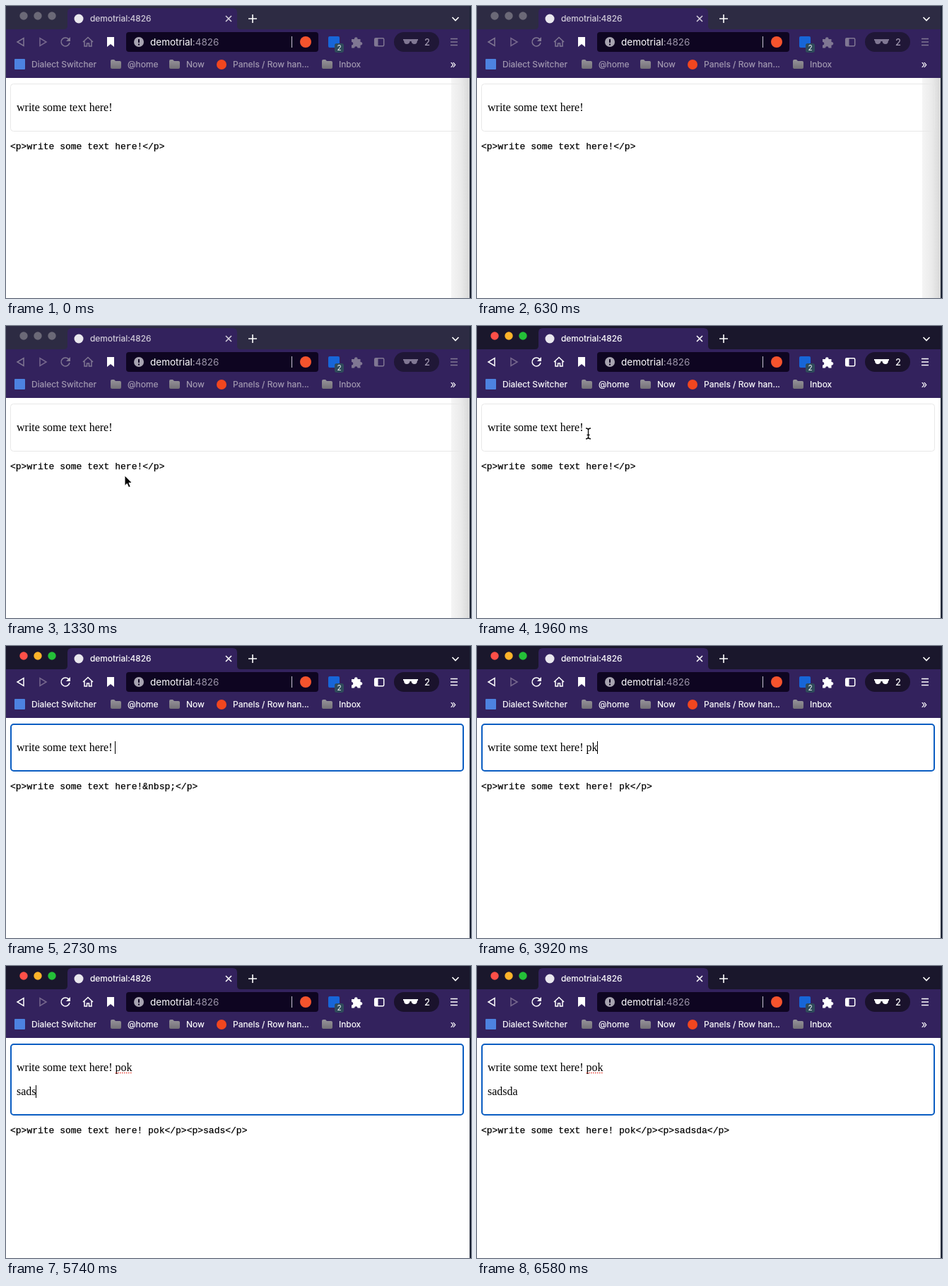
These frames come from a looping animation (658 px wide and 414 px high, 6.65 s). An HTML page:

```html
<!DOCTYPE html>
<html lang="en">
<head>
<meta charset="utf-8">
<title>Rich text editor</title>
<style>
html, body { margin: 0; width: 100%; height: 100%; overflow: hidden; background: #fff }
svg { display: block; width: 658px; height: 414px; --ui: #fff; --label: #fff; --tab: #fff; --strip: #1a172c; --pill: #1a122c }
svg.idle { --ui: #807793; --label: #a49bb2; --tab: #d3cedb; --strip: #2d2b43; --pill: #201737 }
text { white-space: pre }
.ui { font: 12px Inter, sans-serif; fill: #fff }
.marks { fill: var(--label); stroke: var(--label); stroke-width: .2 }
.tab { fill: var(--tab); stroke: var(--tab); stroke-width: .2 }
.line { fill: none; stroke: var(--ui); stroke-width: 1.5 }
.solid { fill: var(--ui) }
.serif { font: 16px "Liberation Serif", serif }
.mono { font: 13px "Liberation Mono", monospace; stroke: #000; stroke-width: .25 }
.idle .light { fill: #6b6977 }
.shade { display: none }
.idle .shade { display: inline }
</style>
</head>
<body>
<svg id="stage" viewBox="0 0 658 414">
  <defs>
    <linearGradient id="fade">
      <stop offset="0" stop-color="#f5f5f5"/>
      <stop offset=".5" stop-color="#ebebeb"/>
      <stop offset="1" stop-color="#d8d8d8"/>
    </linearGradient>
    <linearGradient id="folderFill" x2="0" y2="1">
      <stop offset="0" stop-color="#96939a"/>
      <stop offset="1" stop-color="#747178"/>
    </linearGradient>
    <path id="folder" fill="url(#folderFill)" d="M0 2q0-2 2-2h3l2 2h6q2 0 2 2v7q0 2-2 2h-11q-2 0-2-2z"/>
  </defs>

  <rect width="658" height="414" fill="#fff"/>
  <rect class="shade" x="630" y="102" width="26" height="312" fill="url(#fade)"/>

  <!-- window frame -->
  <rect width="656" height="34" style="fill:var(--strip)"/>
  <path d="M0 33H82Q87 33 87 28V9Q87 3 93 3H321Q327 3 327 9V28Q327 33 332 33H656V102H0Z" fill="#33225d"/>
  <rect x="656" width="2" height="414" fill="#1d2435"/>
  <g>
    <circle class="light" cx="25" cy="14" r="5.700" fill="#fe5048"/>
    <circle class="light" cx="45" cy="14" r="5.700" fill="#fdb42a"/>
    <circle class="light" cx="65" cy="14" r="5.700" fill="#24c138"/>
  </g>
  <circle cx="103" cy="18" r="6.500" fill="#e9e7ee"/>
  <text class="ui tab" x="119" y="22">demotrial:4826</text>
  <g fill="none" stroke-width="1.600">
    <path class="cross" d="M311 14l8 8m0-8l-8 8" style="stroke:var(--tab)"/>
    <path d="M343 18h12m-6-6v12M631.500 16l4.500 4.500 4.500-4.500" stroke="#fff"/>
  </g>

  <!-- toolbar -->
  <path class="line" d="M25 45.500v11l-9-5.500z"/>
  <path d="M48 45.500v11l9-5.500z" fill="none" stroke="#78698f" stroke-width="1.500"/>
  <path class="line" d="M89 47.500A6 6 0 1 0 90 52"/>
  <path class="solid" d="M91 44v6h-6z"/>
  <path class="line" d="M109 51l7-6.500 7 6.500M111 50v7h3.500v-4h3v4h3.500v-7"/>
  <path d="M143 44h10v14l-5-4-5 4z" fill="#fff"/>
  <rect x="170" y="37" width="272" height="28" rx="4" fill="#0e0521"/>
  <circle cx="188" cy="51" r="7" fill="#a8a4b1"/>
  <path d="M188 47v5m0 1.500v2" stroke="#0e0521" stroke-width="2"/>
  <text class="ui" x="204" y="56" style="font-size:13.500px">demotrial<tspan fill="#9b94a8">:4826</tspan></text>
  <path d="M404.500 43v16" stroke="#c9c5d2"/>
  <circle cx="424" cy="51" r="8" fill="#f5532d"/>
  <rect x="456" y="43" width="16" height="16" rx="2" fill="#1766d8"/>
  <rect x="465" y="53" width="13" height="13" rx="3" fill="#2f4b5b"/>
  <text class="ui" x="468.500" y="63" style="font-size:10px">2</text>
  <path class="solid" d="M489 47h4a2.300 2.300 0 1 1 4.500 0h4v4a2.300 2.300 0 1 1 0 4.500v4h-4a2.200 2.200 0 1 0-4.500 0h-4v-4a2.200 2.200 0 1 0 0-4.500z"/>
  <rect class="line" x="521.700" y="45.700" width="13" height="11" rx="1.500"/>
  <path class="solid" d="M522 46h4.500v10h-4.500z"/>
  <rect x="549" y="37" width="64" height="28" rx="14" style="fill:var(--pill)"/>
  <path class="solid" d="M562 47h21v2h-1q0 5-4 5-4 0-4.500-4h-2q-.5 4-4.500 4-4 0-4-5h-1z"/>
  <text class="ui marks" x="592" y="56" style="font-size:13px">2</text>
  <path class="line" d="M629 46.500h10m-10 4.500h10m-10 4.500h10"/>

  <!-- bookmarks -->
  <rect x="12" y="75" width="15" height="15" rx="1" fill="#4d82e0"/>
  <use href="#folder" x="148" y="76"/>
  <use href="#folder" x="231" y="76"/>
  <use href="#folder" x="447" y="76"/>
  <circle cx="305" cy="83" r="7" fill="#f1461f"/>
  <g class="ui marks">
    <text x="36" y="87">Dialect Switcher</text>
    <text x="172" y="87">@home</text>
    <text x="255" y="87">Now</text>
    <text x="321" y="87">Panels / Row han...</text>
    <text x="471" y="87">Inbox</text>
  </g>
  <text class="ui" x="628.500" y="87.500" style="font-size:15px">»</text>

  <!-- editor -->
  <rect id="box" rx="4" fill="none"/>
  <text id="first" class="serif" x="15" y="149"></text>
  <text id="second" class="serif" x="15" y="183"></text>
  <path id="typo" d="M155 151.500h23.500" stroke="#e8453c" stroke-width="1.500" stroke-dasharray="1.500 1.500"/>
  <rect id="caret" width="1" height="18"/>
  <text id="markup" class="mono" x="6"></text>
  <path id="arrow" d="M0 0v14.500l3.300-3 2.300 5.300 2.600-1.100-2.300-5.200h4.600z" fill="#000" stroke="#fff"/>
  <path id="beam" d="M-3.500-7.500q3.500 0 3.500 2.500 0-2.500 3.500-2.500M0-5v10M-3.500 7.500q3.500 0 3.500-2.500 0 2.500 3.500 2.500M-2 2h4" fill="none" stroke="#111" stroke-width="1.400"/>
</svg>
<script>
const LOOP = 6650, STEP = 70;
const ACTIVATE = 1610, FOCUS = 2170, SPELLCHECK = 5180;
const BASE = 'write some text here!';

// [time, end of first line, second line]
const edits = [
  [FOCUS, ''], [2520, ' '], [3430, ' p'], [3640, ' pk'],
  [4130, ' p'], [4340, ' po'], [4550, ' pok'], [4830, ' pok', '']
];
[...'sadsda'].forEach((_, i) =>
  edits.push([5320 + i * 140, ' pok', 'sadsda'.slice(0, i + 1)]));

// [time, x, y]
const mouse = [[700, 300, 420], [1120, 168, 212], [1400, 168, 212], [1750, 157.5, 152.5]];

const $ = id => document.getElementById(id);
const show = (id, on) => $(id).style.display = on ? 'inline' : 'none';
const set = (id, attrs) => {
  for (const key in attrs) $(id).setAttribute(key, attrs[key]);
};

function mouseAt(t) {
  const i = mouse.findIndex(p => p[0] > t);
  if (i < 0) return mouse[mouse.length - 1].slice(1);
  if (!i) return mouse[0].slice(1);
  const [a, b] = [mouse[i - 1], mouse[i]];
  const k = (t - a[0]) / (b[0] - a[0]), ease = k * k * (3 - 2 * k);
  return [1, 2].map(n => a[n] + (b[n] - a[n]) * ease);
}

function draw(t) {
  const [since, tail = '', second] = edits.filter(e => e[0] <= t).pop() || [0];
  const focused = t >= FOCUS, split = second !== undefined;
  const active = t >= ACTIVATE;
  $('stage').classList.toggle('idle', !active);

  const inset = focused ? 1 : .5, height = split ? 102 : 68;
  set('box', {
    x: 6 + inset, y: 110 + inset,
    width: 642 - 2 * inset, height: height - 2 * inset,
    stroke: focused ? '#0a5dc2' : '#e8e8e8', 'stroke-width': 2 * inset
  });
  $('first').textContent = BASE + tail;
  $('second').textContent = second || '';
  $('markup').textContent = '<p>' + BASE + (tail === ' ' ? '&nbsp;' : tail) + '</p>' +
    (split ? `<p>${second || '<br>'}</p>` : '');
  set('markup', { y: split ? 237 : 203 });

  show('typo', t >= SPELLCHECK);
  show('caret', focused && (t - since) % 1000 < 500);
  const width = split && !second ? 0 : $(split ? 'second' : 'first').getComputedTextLength();
  set('caret', { x: Math.floor(15 + width), y: split ? 169 : 135 });

  const transform = `translate(${mouseAt(t)})`;
  const visible = t >= mouse[0][0] && t < edits[1][0];
  set('arrow', { transform });
  set('beam', { transform });
  show('arrow', visible && !active);
  show('beam', visible && active);
}

const start = performance.now();
function tick() {
  const t = (performance.now() - start) % LOOP;
  draw(Math.floor(t / STEP) * STEP);
  requestAnimationFrame(tick);
}
tick();
</script>
</body>
</html>
```
